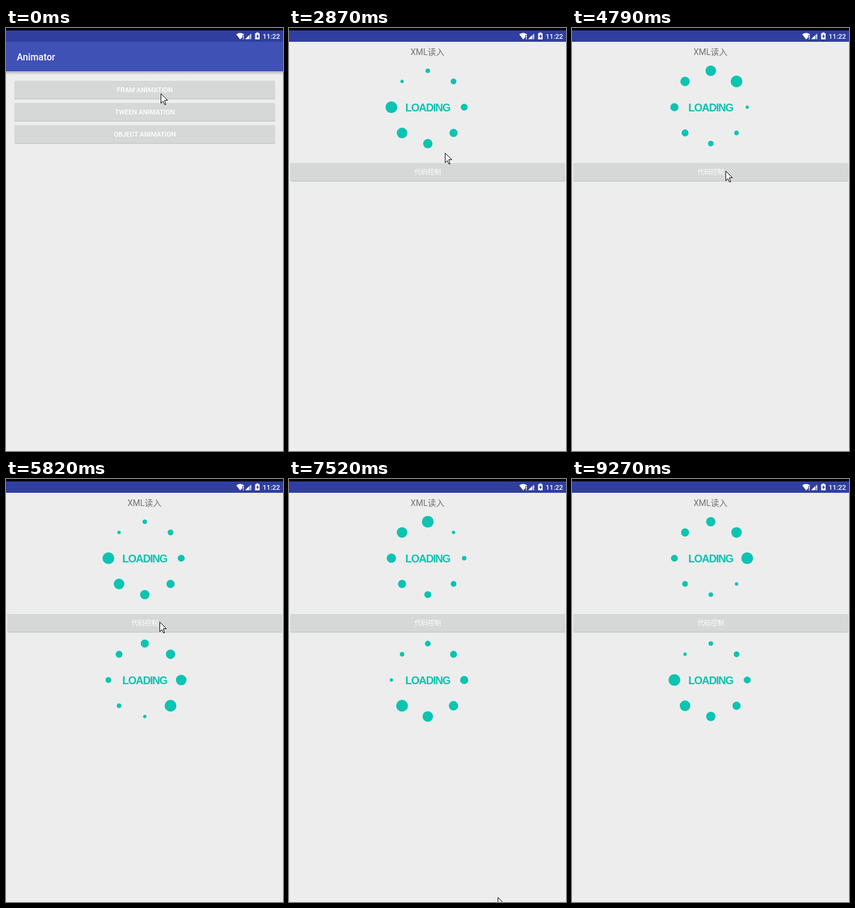
An HTML page for the animation above (9.37 s loop, 462 px wide and 705 px high).

```html
<!DOCTYPE html>
<html lang="en">
<head>
<meta charset="utf-8">
<title>Animator</title>
<style>
  html, body { margin: 0; width: 100%; height: 100%; overflow: hidden; background: #ededed; }
  svg { display: block; width: 462px; height: 705px; }
  text { font-family: Roboto, "Noto Sans CJK SC", "Noto Sans CJK", sans-serif; fill: #fff; }
  .button { font-size: 11.1px; font-weight: 500; text-anchor: middle; }
  .spinner { fill: #0bc4b1; filter: url(#soft); }
  .logo { font: bold 18px "Liberation Sans", Arial, sans-serif; letter-spacing: -1.2px; fill: inherit; }
</style>
</head>
<body>
<svg viewBox="0 0 462 705">
  <defs>
    <linearGradient id="shade" x2="0" y2="1">
      <stop offset="0" stop-opacity=".25"/>
      <stop offset="1" stop-opacity="0"/>
    </linearGradient>
    <filter id="soft"><feGaussianBlur stdDeviation=".6"/></filter>
  </defs>
  <rect width="462" height="705" fill="#ededed"/>
  <g id="menu">
    <rect y="23" width="462" height="49" fill="#3f51b5"/>
    <rect y="72" width="462" height="6" fill="url(#shade)"/>
    <text id="title" x="18" y="54" font-size="15.6" font-weight="500">Animator</text>
  </g>
  <g id="page">
    <rect y="23" width="462" height="760" fill="#ededed"/>
    <text x="231" y="44.5" font-size="14" text-anchor="middle" style="fill:#737373">XML读入</text>
  </g>
  <g id="status">
    <rect width="462" height="4"/>
    <rect y="4" width="462" height="19" fill="#303f9f"/>
    <g fill="#fff">
      <path d="M384 10.5Q390.5 6 397 10.5L396 12H394V15.5L390.5 19Z"/>
      <path d="M395 12.5h1.5v4h-1.5zM395 17.5h1.5v1.5h-1.5z"/>
      <path d="M409 8.5V18.5H399Z" opacity=".4"/>
      <path d="M405.5 12V18.5H399ZM407.5 11h1.5v5h-1.5zM407.5 17h1.5v1.5h-1.5z"/>
      <path d="M417.5 7.5h3.5v1.2h2v10.3h-7.5v-10.3h2z"/>
      <path d="M420 10L417 14.5h2v3l3-4.5h-2z" fill="#303f9f"/>
    </g>
    <text x="428" y="18" font-size="11.4" font-weight="500">11:22</text>
  </g>
  <path id="cursor" d="M.5.5V16.5L4 13L6.5 18.5H8.5L6.5 11.5H11.5Z" fill="#fff" stroke="#000"/>
</svg>
<script>
const LOOP = 9370;
const STEP = 176;          // time between spinner poses
const UPPER_START = 1797;
const LOWER_START = 5231;
const OPEN = 1900;         // the second page comes in
const REFRESH = 150;       // the page transition advances in these jumps

// Pointer glides: start time, end time, target x, target y
const HOME = [258, 109];
const GLIDES = [
  [800, 950, 263, 106],
  [2050, 2870, 260, 208],
  [2870, 3150, 256, 238],
  [6700, 7250, 355, 471],
  [7250, 7550, 347, 721]
];

const $ = id => document.getElementById(id);
const clamp = v => Math.max(0, Math.min(1, v));
const easeOut = (progress, power) => 1 - (1 - clamp(progress)) ** power;

function add(parent, tag, attrs, text = "") {
  const el = document.createElementNS("http://www.w3.org/2000/svg", tag);
  for (const key in attrs) el.setAttribute(key, attrs[key]);
  el.textContent = text;
  return parent.appendChild(el);
}

function addButton(parent, x, y, width, label) {
  add(parent, "rect", { x, y: y + 1, width, height: 30, rx: 2, fill: "#c5c6c6" });
  add(parent, "rect", { x, y, width, height: 29.7, rx: 2, fill: "#d6d7d7" });
  add(parent, "text", { x: 231.5, y: y + 19, class: "button" }, label);
}

// Eight dots around a label; the largest leads, the others shrink behind it.
function addSpinner(parent, cy, start) {
  const group = add(parent, "g", { class: "spinner" });
  const dots = Array.from({ length: 8 }, (_, i) => {
    const angle = i * Math.PI / 4;
    return add(group, "circle", {
      cx: 231.5 + 60.7 * Math.sin(angle),
      cy: cy - 60.7 * Math.cos(angle)
    });
  });
  add(group, "text", { x: 194, y: cy + 6.5, class: "logo" }, "LOADING");
  return t => {
    const lead = Math.max(0, Math.floor((t - start) / STEP));
    dots.forEach((dot, i) => dot.setAttribute("r", 9.8 - (lead + 8 - i) % 8));
    group.setAttribute("visibility", t < start ? "hidden" : "visible");
  };
}

["FRAM ANIMATION", "TWEEN ANIMATION", "OBJECT ANIMATION"].forEach((label, i) =>
  addButton($("menu"), 14, 88 + 37 * i, 435, label));
addButton($("page"), 2, 225, 459, "代码控制");
const spinners = [
  addSpinner($("page"), 132, UPPER_START),
  addSpinner($("page"), 335, LOWER_START)
];

function pointerAt(t) {
  let [x, y] = HOME;
  for (const [from, to, nextX, nextY] of GLIDES) {
    const p = clamp((t - from) / (to - from));
    x += (nextX - x) * p;
    y += (nextY - y) * p;
  }
  return [Math.round(x), Math.round(y)];
}

function drawPage(t) {
  const age = 20 + Math.floor((t - OPEN) / REFRESH) * REFRESH;
  const alpha = t < OPEN ? 0 : easeOut(age / 200, 4);
  const shift = 56 * (1 - easeOut(age / 350, 5));
  $("page").setAttribute("opacity", alpha);
  $("page").setAttribute("transform", `translate(0 ${shift})`);
  $("menu").setAttribute("visibility", alpha > .99 ? "hidden" : "visible");
  $("title").setAttribute("opacity", 1 - alpha);
}

function draw(t) {
  drawPage(t);
  spinners.forEach(turn => turn(t));
  $("cursor").setAttribute("transform", `translate(${pointerAt(t)})`);
}

const start = performance.now();
function tick() {
  draw((performance.now() - start) % LOOP);
  requestAnimationFrame(tick);
}
tick();
</script>
</body>
</html>
```
